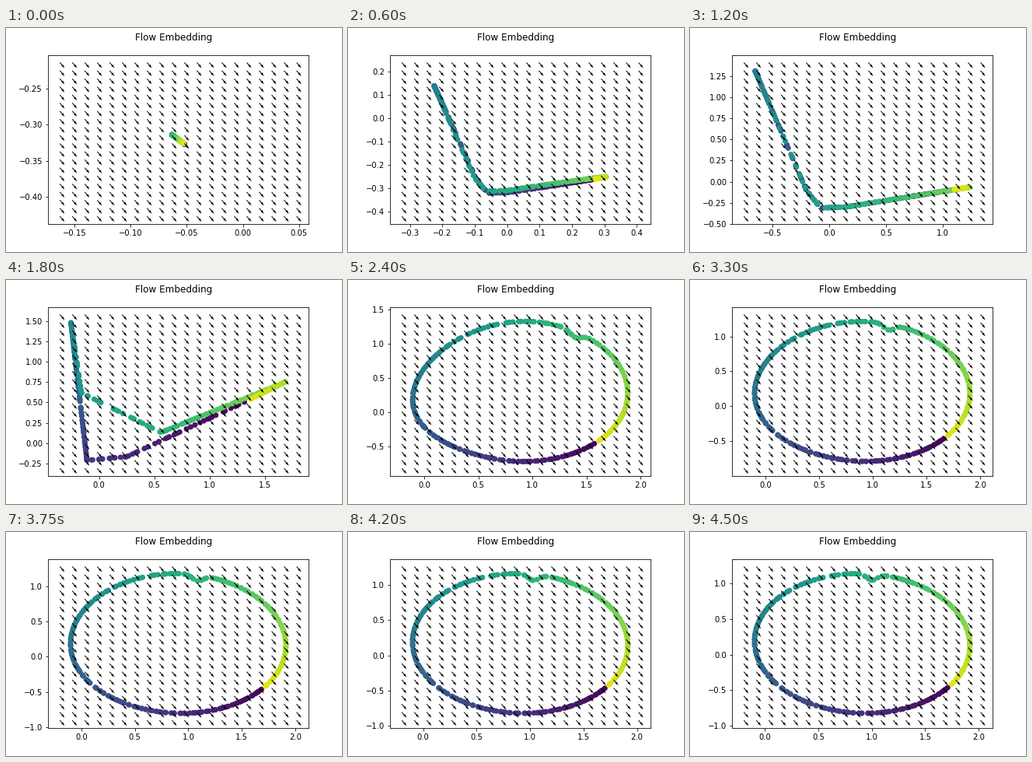
A matplotlib script that plays this animation: 432x288 px, repeating every 4.65 s.

```python
import numpy as np
import matplotlib.pyplot as plt
from matplotlib.animation import FuncAnimation

STEPS, INTERVAL = 31, 150
MARGIN, GRID, DOTS = 0.1, 20, 260


def make_phase():
    """Evenly jittered positions along the loop, with a few gaps."""
    jitter = np.random.default_rng(7).uniform(0, 1.7, DOTS)
    t = np.sort((np.arange(DOTS) + jitter) / (DOTS + 1))
    for gap in (.29, .54, .598):
        t = t[abs(t - gap) > .004]
    return t


phase = make_phase()


def wave(peak):
    return np.cos(2 * np.pi * (phase - peak))


def mix(a, b, w):
    return a + (b - a) * w


def clump():
    s = .5 + .5 * wave(.08)
    return np.column_stack([-.0632 + .0111 * s, -.3138 - .0129 * s])


def bent_line():
    x = .291 + .939 * wave(.91)
    y = np.interp(x, [-.65, -.2, -.075, .143, 1.23],
                  [1.315, -.1, -.31, -.3, -.065])
    return np.column_stack([x, y])


def hook():
    corners = [(0, 1.35, .53), (.12, .25, -.17), (.17, -.11, -.215),
               (.47, -.256, 1.5), (.57, -.16, .62), (.655, .56, .13),
               (.9, 1.687, .755), (1, 1.35, .53)]
    t, x, y = zip(*corners)
    return np.column_stack([np.interp(phase, t, x), np.interp(phase, t, y)])


def ring(w):
    """Tilted oval with a dent that slides left as w goes from 0 to 1."""
    x = mix(.887, .91, w) + mix(.995, 1.008, w) * wave(mix(.875, .9, w))
    mid = mix(.308, .157, w)
    y = mid - mix(1.03, .985, w) * wave(mix(.12, .145, w))
    y -= .17 * (1 - w) * np.clip(-wave(.92), 0, 1) ** 2
    dent = .085 * np.exp(-((x - 1.4 + .4 * w) / .07) ** 2)
    return np.column_stack([x, y - np.where(y > mid, dent, 0)])


def points(step):
    if step <= 8:
        return mix(clump(), bent_line(), (max(step - 1, 0) / 7) ** 1.5)
    if step <= 12:
        return mix(bent_line(), hook(), (step - 8) / 4)
    if step <= 16:
        return mix(hook(), ring(0), (step - 12) / 4)
    return ring(((step - 16) / 14) ** .55)


fig = plt.figure(figsize=(6, 4), dpi=72, facecolor="white")
ax = fig.add_axes([.125, .125, .775, .755])
fig.suptitle("Flow Embedding", fontsize=12)


def draw(step):
    p = points(step)
    lo, hi = p.min(axis=0) - MARGIN, p.max(axis=0) + MARGIN
    gx, gy = np.meshgrid(*(np.linspace(a, b, GRID) for a, b in zip(lo, hi)))
    ax.clear()
    ax.scatter(p[:, 0], p[:, 1], c=phase, cmap="viridis", vmin=0, vmax=1.04)
    ax.quiver(gx, gy, np.ones_like(gx), np.full_like(gy, -1.15))
    pad = .05 * (hi - lo)
    ax.set_xlim(lo[0] - pad[0], hi[0] + pad[0])
    ax.set_ylim(lo[1] - pad[1], hi[1] + pad[1])
    return []


anim = FuncAnimation(fig, draw, frames=STEPS, init_func=lambda: draw(0),
                     interval=INTERVAL, repeat=True, repeat_delay=0)
plt.show()
```
